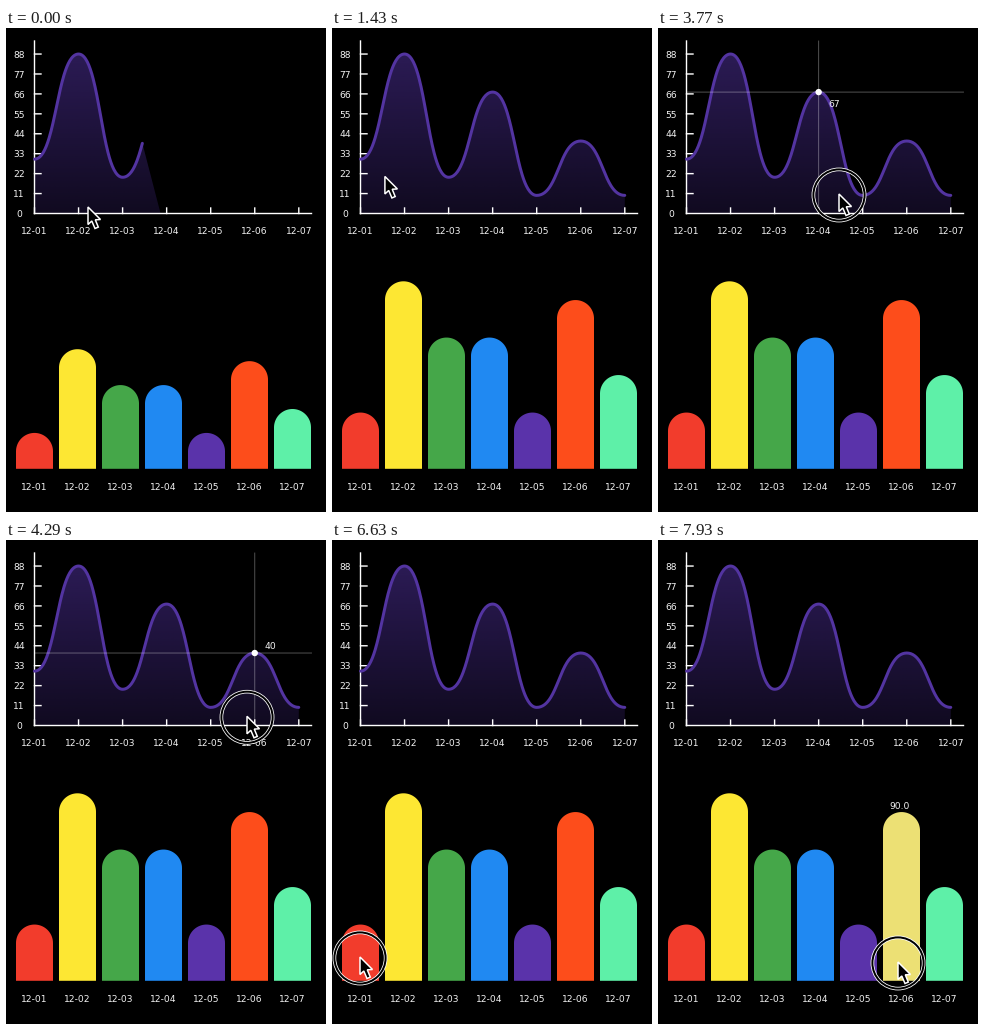
A matplotlib script that plays this animation: 320x484 px, repeating every 8000 ms.

```python
import matplotlib.pyplot as plt
import numpy as np
from matplotlib.animation import FuncAnimation
from matplotlib.patches import Circle, Polygon
from matplotlib.path import Path

W, H, DPI = 320, 484, 100
PX = 72 / DPI
LOOP, STEP = 8000, 130
FRAMES = 62

DAYS = [f"12-0{d}" for d in range(1, 8)]
LINE_VALUES = [30, 88, 20, 67, 10, 40, 10]
BAR_VALUES = [30, 100, 70, 70, 30, 90, 50]
BAR_COLORS = ["#f23c2c", "#fde733", "#45a749", "#2089f2",
              "#5a33aa", "#fd4d1b", "#5ef0a8"]
HIGHLIGHT = "#ece074"
LEFT, RIGHT, TOP, BASE = 28.5, 305.5, 13, 185.5
DAY_GAP, UNIT = 44.05, 1.812
BAR_BASE, BAR_WIDTH, BAR_GAP, BAR_UNIT = 440.8, 37, 43, 1.875

# Pointer path: time in ms, x, y
POINTER = np.array([
    (0, 82, 179), (650, 66, 161), (2080, 42, 138), (2860, 42, 138),
    (3770, 181, 166), (4680, 286, 184), (4940, 288, 186), (5590, 286, 187),
    (6370, 28, 417), (6760, 28, 417), (7930, 240, 422),
])
ARROW = np.array([(0, 0), (0, 17.5), (3.8, 14), (7, 21.5),
                  (10.3, 20.1), (7.3, 12.8), (12.5, 12.5)])

point_x = LEFT + DAY_GAP * np.arange(7)
point_y = BASE - UNIT * np.array(LINE_VALUES)
bar_x = 10 + BAR_GAP * np.arange(7)


def smooth_curve(xs, ys, n=60):
    """Cubic Bezier segments with level tangents at every point."""
    u = np.linspace(0, 1, n)
    cx, cy = [], []
    for x0, x1, y0, y1 in zip(xs, xs[1:], ys, ys[1:]):
        mid = (x0 + x1) / 2
        ends = (1 - u) ** 3, u ** 3
        cx.append(ends[0] * x0 + 3 * u * (1 - u) * mid + ends[1] * x1)
        cy.append(y0 + (y1 - y0) * (3 * u ** 2 - 2 * u ** 3))
    return np.concatenate(cx), np.concatenate(cy)


curve_x, curve_y = smooth_curve(point_x, point_y)
arc = np.append(0, np.cumsum(np.hypot(np.diff(curve_x), np.diff(curve_y))))
arc /= arc[-1]


def trimmed_curve(p):
    keep = arc < p
    return (np.append(curve_x[keep], np.interp(p, arc, curve_x)),
            np.append(curve_y[keep], np.interp(p, arc, curve_y)))


def ease_in_out(u):
    u = min(max(u, 0), 1)
    return 2 * u * u if u < 0.5 else 1 - 2 * (1 - u) ** 2


def bar_shape(x, height):
    r = min(BAR_WIDTH / 2, height)
    a = np.linspace(np.pi, 0, 40)
    cap = np.column_stack([x + BAR_WIDTH / 2 + BAR_WIDTH / 2 * np.cos(a),
                           BAR_BASE - height + r - r * np.sin(a)])
    return np.vstack([(x, BAR_BASE), cap, (x + BAR_WIDTH, BAR_BASE)])


fig = plt.figure(figsize=(W / DPI, H / DPI), dpi=DPI, facecolor="black")
ax = fig.add_axes([0, 0, 1, 1])


def label(x, y, text="", ha="center", z=6):
    return ax.text(x, y, text, color="#f2f2f2", ha=ha, va="baseline",
                   fontsize=9.1 * PX, family="DejaVu Sans", zorder=z)


def stroke(xs, ys, color="white", width=1.4, z=3, **kw):
    return ax.plot(xs, ys, color=color, lw=width * PX, zorder=z,
                   snap=False, **kw)[0]


# Line chart
shade = np.zeros((128, 1, 4))
shade[..., :3] = np.array([84, 52, 164]) / 255
shade[..., 3] = np.linspace(0.52, 0.2, 128)[:, None]
area = ax.imshow(shade, extent=(LEFT, RIGHT, BASE, point_y.min()),
                 aspect="auto", zorder=1)
ax.set(xlim=(0, W), ylim=(H, 0))
ax.axis("off")

curve = stroke([], [], "#5334a1", 3, z=4, solid_capstyle="round")
stroke([LEFT, LEFT], [TOP, BASE])
stroke([LEFT, RIGHT], [BASE, BASE])
for value in range(0, 89, 11):
    y = BASE - value * UNIT
    label(13, y + 3.7, str(value))
    if value:
        stroke([LEFT, LEFT + 6.5], [y, y])
for x, day in zip(point_x, DAYS):
    label(x, 206.5, day)
    stroke([x, x], [BASE - 5.5, BASE])

cross_v = stroke([], [], "white", 0.9, z=5, alpha=0.35)
cross_h = stroke([], [], "white", 0.9, z=5, alpha=0.35)
dot = ax.add_patch(Circle((0, 0), 3.2, fc="white", ec="none", zorder=6))
point_label = label(0, 0, ha="left")

# Bar chart
bars = []
for x, color, day in zip(bar_x, BAR_COLORS, DAYS):
    bars.append(ax.add_patch(Polygon(bar_shape(x, 1), fc=color, ec="none",
                                     snap=False, zorder=3)))
    label(x + BAR_WIDTH / 2, 462.5, day)
bar_label = label(0, 0, ha="left")

# Pointer
rings = [ax.add_patch(Circle((0, 0), 25.6, fill=False, ec=color,
                             lw=width * PX, zorder=8))
         for color, width in (("white", 3.6), ("black", 2.0))]
arrow = ax.add_patch(Polygon(ARROW, fc="black", ec="white", lw=1.5 * PX,
                             snap=False, joinstyle="miter", zorder=9))


def draw_line_chart(t, x):
    p = min(0.477 + 0.000377 * t, 1)
    xs, ys = trimmed_curve(p)
    curve.set_data(xs, ys)
    foot = LEFT + p * (point_x[-1] - LEFT)
    outline = np.column_stack([np.append(xs, [foot, LEFT, LEFT]),
                               np.append(ys, [BASE, BASE, ys[0]])])
    area.set_clip_path(Path(outline), ax.transData)

    active = 2990 <= t < 5720
    for part in (cross_v, cross_h, dot, point_label):
        part.set_visible(active)
    if active:
        i = int(np.clip(round((x - LEFT) / DAY_GAP), 0, 6))
        px, py = point_x[i], point_y[i]
        cross_v.set_data([px, px], [TOP, BASE])
        cross_h.set_data([LEFT, RIGHT], [py, py])
        dot.center = px, py
        point_label.set_text(str(LINE_VALUES[i]))
        point_label.set_position(
            (px + 10, py + (15 if LINE_VALUES[i] > 44 else -4)))


def draw_bar_chart(t, x):
    grow = ease_in_out((t + 1249) / 2174)
    active = t >= 6890
    chosen = int(np.clip((x - bar_x[0] + 3) // BAR_GAP, 0, 6)) if active else -1
    for i, bar in enumerate(bars):
        bar.set_xy(bar_shape(bar_x[i], BAR_VALUES[i] * BAR_UNIT * grow))
        bar.set_facecolor(HIGHLIGHT if i == chosen else BAR_COLORS[i])
    bar_label.set_visible(active)
    if active:
        value = BAR_VALUES[chosen]
        bar_label.set_text(f"{value:.1f}")
        bar_label.set_position((bar_x[chosen] + 6,
                                BAR_BASE - value * BAR_UNIT - 3.5))


def update(frame):
    t = frame * STEP
    x, y = (np.interp(t, POINTER[:, 0], POINTER[:, k]) for k in (1, 2))
    draw_line_chart(t, x)
    draw_bar_chart(t, x)
    pressed = 2340 <= t < 5720 or t >= 6500
    for ring in rings:
        ring.center = x, y + 1
        ring.set_visible(pressed)
    arrow.set_xy(ARROW + (x, y))
    return []


anim = FuncAnimation(fig, update, frames=FRAMES, interval=LOOP / FRAMES,
                     init_func=lambda: update(0), repeat=True, repeat_delay=0,
                     blit=False)
plt.show()
```
